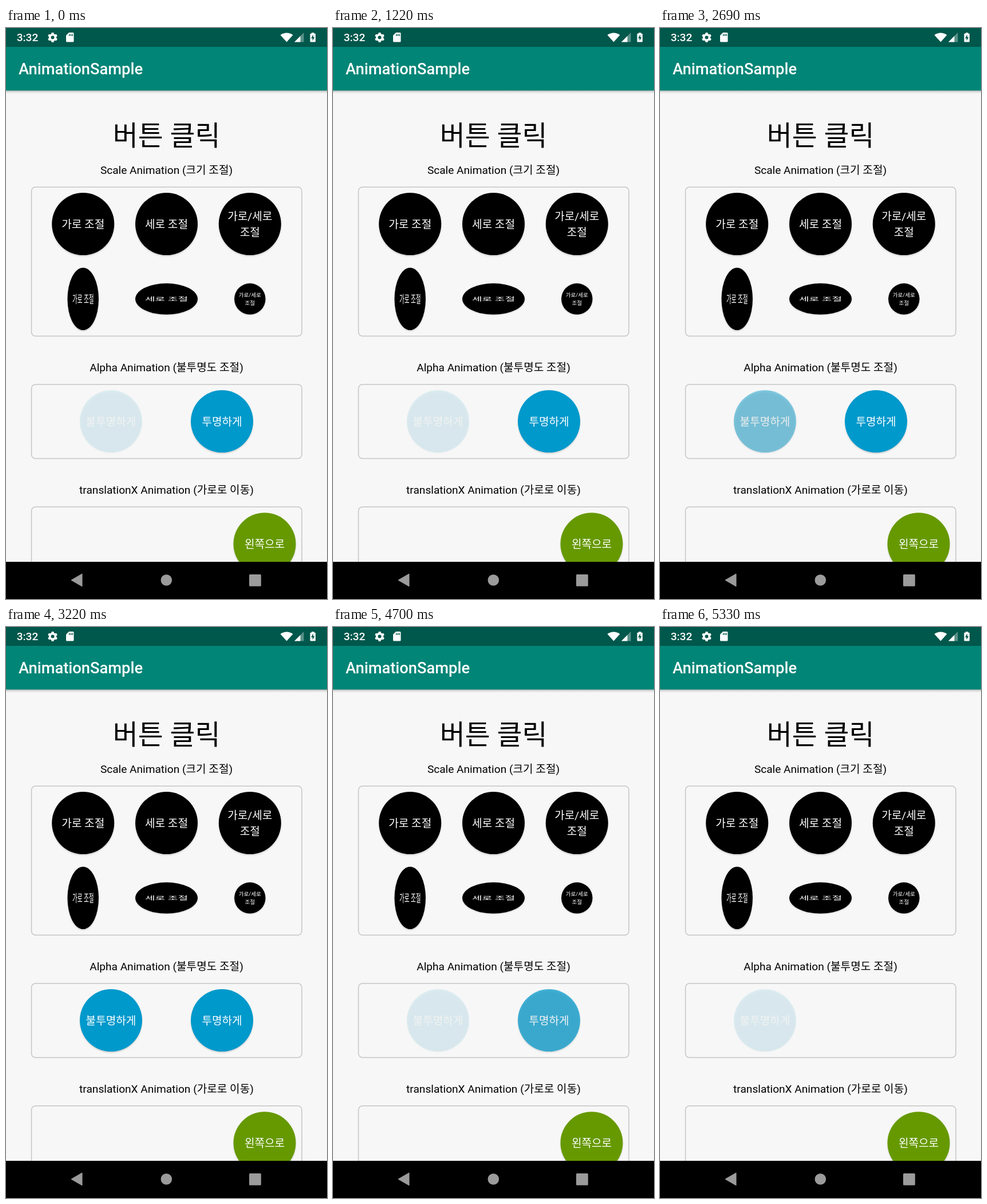
Animation of 561 by 998 pixels, one loop 7.02 s. Source, as an HTML page:

```html
<!DOCTYPE html>
<html lang="ko">
<head>
<meta charset="utf-8">
<title>AnimationSample</title>
<style>
  html, body { margin: 0; width: 100%; height: 100%; overflow: hidden; background: #f7f7f7; }
  svg { display: block; width: 100%; height: 100%; }
  text { font-family: Roboto, "Noto Sans CJK KR", "Noto Sans CJK JP", "Noto Sans CJK", sans-serif; font-size: 19.1px; }
  .mid { text-anchor: middle; }
  .btn text { fill: #fff; text-anchor: middle; }
  .medium { font-weight: 500; fill: #fff; }
  .frame { fill: none; stroke: #c5c5c5; stroke-width: 1.5; }
</style>
</head>
<body>
<svg viewBox="0 0 561 998">
  <defs>
    <filter id="soft" x="-20%" y="-20%" width="140%" height="140%"><feGaussianBlur stdDeviation="1.8"/></filter>
    <linearGradient id="drop" x2="0" y2="1">
      <stop offset="0" stop-color="#000" stop-opacity=".3"/>
      <stop offset=".4" stop-color="#000" stop-opacity=".11"/>
      <stop offset="1" stop-color="#000" stop-opacity="0"/>
    </linearGradient>
  </defs>
  <rect width="561" height="998" fill="#f7f7f7"/>

  <rect y="109" width="561" height="6" fill="url(#drop)"/>
  <rect width="561" height="109.3" fill="#008577"/>
  <rect width="561" height="33" fill="#00574b"/>
  <text class="medium" x="22" y="81" style="font-size:27.3px">AnimationSample</text>

  <text class="medium" x="18.7" y="23.3">3:32</text>
  <g id="gear" transform="translate(81.5 16.5)" fill="#fff">
    <circle r="4.8" fill="none" stroke="#fff" stroke-width="3.7"/>
  </g>
  <g fill="#fff">
    <path d="M110 8H117Q118.5 8 118.5 9.5V23Q118.5 24.5 117 24.5H106.500Q105 24.5 105 23V13Z"/>
    <path d="M110.700 10.500v3.500M113.500 10.500v3.500M116.200 10.500v3.500" stroke="#00574b" stroke-width="1.4"/>
    <path d="M479.500 12.300Q490.500 4.800 501.500 12.300L490.500 24.600Z"/>
    <path d="M520.500 8V24.500H504Z" opacity=".35"/>
    <path d="M514.500 14V24.500H504Z"/>
    <path d="M534 8.200h4.500v1.600H540q1 0 1 1V23.500q0 1-1 1h-7.500q-1 0-1-1V10.800q0-1 1-1H534Z"/>
    <path d="M537 11.500L533.200 18H535.700V22.500L539.300 16H537Z" fill="#00574b"/>
  </g>

  <text class="mid" x="280.700" y="204.500" style="font-size:47.8px">버튼 클릭</text>
  <text class="mid" x="280.500" y="255">Scale Animation (크기 조절)</text>
  <text class="mid" x="280.500" y="600">Alpha Animation (불투명도 조절)</text>
  <text class="mid" x="280.500" y="814">translationX Animation (가로로 이동)</text>
  <rect class="frame" x="44.500" y="278" width="472.500" height="260.500" rx="7"/>
  <rect class="frame" x="44.500" y="623" width="472.500" height="129.500" rx="7"/>
  <rect class="frame" x="44.500" y="837" width="472.500" height="129.500" rx="7"/>

  <g id="buttons"></g>

  <rect y="933" width="561" height="65"/>
  <g fill="#9b9b9b">
    <path d="M114 965L133 954V976Z" stroke="#9b9b9b" stroke-linejoin="round"/>
    <circle cx="280.300" cy="965" r="9.800"/>
    <rect x="425" y="955" width="20.800" height="20.800" rx="1.500"/>
  </g>
</svg>
<script>
const LOOP = 7020, FADE = 1000, FADE_IN = 2250, FADE_OUT = 4347, RESET = 4250;
const BLACK = '#000', BLUE = '#0099cc', GREEN = '#669900', R = 54.5;

function add(parent, tag, attrs, text = '') {
  const el = document.createElementNS('http://www.w3.org/2000/svg', tag);
  for (const key in attrs) el.setAttribute(key, attrs[key]);
  el.textContent = text;
  return parent.appendChild(el);
}

// Shadow and face fade separately, so the shadow shows through the face.
function button(x, y, fill, lines, sx = 1, sy = 1) {
  const g = add(document.getElementById('buttons'), 'g',
    { class: 'btn', transform: `translate(${x} ${y}) scale(${sx} ${sy})` });
  const shadow = add(g, 'circle', { cy: 2, r: R - 0.5, filter: 'url(#soft)' });
  const face = add(g, 'g', {});
  add(face, 'circle', { r: R, fill });
  lines.forEach((line, i) =>
    add(face, 'text', { y: 7 + 28 * (i - (lines.length - 1) / 2) }, line));
  const setAlpha = a => {
    shadow.setAttribute('opacity', 0.2 * a);
    face.setAttribute('opacity', a);
  };
  setAlpha(1);
  return setAlpha;
}

const scaled = [
  [134.7, ['가로 조절'], 0.5, 1],
  [280.5, ['세로 조절'], 1, 0.5],
  [426.3, ['가로/세로', '조절'], 0.5, 0.5]
];
for (const [x, lines, sx, sy] of scaled) {
  button(x, 342.6, BLACK, lines);
  button(x, 473.6, BLACK, lines, sx, sy);
}
const setLeft = button(183.5, 687.6, BLUE, ['불투명하게']);
const setRight = button(377.5, 687.6, BLUE, ['투명하게']);
button(452, 901.7, GREEN, ['왼쪽으로']);

const gear = document.getElementById('gear');
for (let a = 0; a < 360; a += 60)
  add(gear, 'path', { d: 'M-2.500 -5L-1.800 -8.500H1.800L2.500 -5Z', transform: `rotate(${a})` });

function ease(t, start) {
  const p = Math.min(1, Math.max(0, (t - start) / FADE));
  return (1 - Math.cos(Math.PI * p)) / 2;
}

function draw(t) {
  setLeft(t < RESET ? 0.1 + 0.9 * ease(t, FADE_IN) : 0.1);
  setRight(1 - ease(t, FADE_OUT));
}

const begin = performance.now();
function tick() {
  draw((performance.now() - begin) % LOOP);
  requestAnimationFrame(tick);
}
draw(0);
requestAnimationFrame(tick);
</script>
</body>
</html>
```
